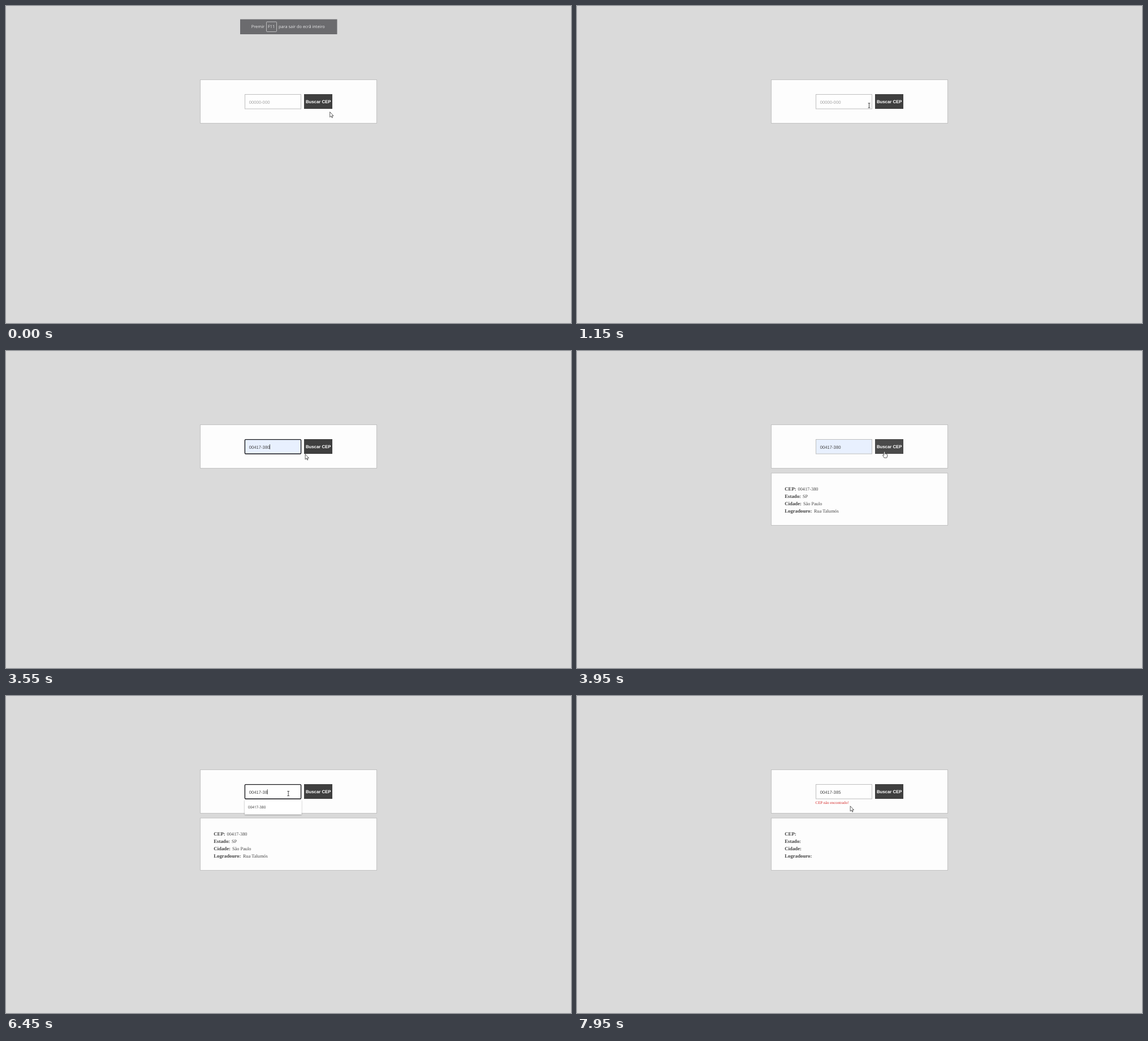
These frames come from a looping animation (999x561 px, 8 s). An HTML page:

```html
<!DOCTYPE html>
<html lang="pt">
<head>
<meta charset="utf-8">
<title>Buscar CEP</title>
<style>
html, body { margin: 0; width: 100%; height: 100%; overflow: hidden; background: #dadada; }
svg { display: block; width: 100%; height: 100%; }
text { text-rendering: geometricPrecision; white-space: pre; }
.card { fill: #fdfdfd; stroke: #c2c2c2; }
.sans { font: 7.7px "Liberation Sans", Arial, sans-serif; }
.ui { font: 7.4px "Open Sans", sans-serif; fill: #e9e9ea; }
.serif { font: 8.3px "Liberation Serif", serif; fill: #454545; }
.serif .label { font-size: 8.8px; font-weight: bold; fill: #404040; }
.cursor { fill: #fff; stroke: #333; stroke-width: .8; stroke-linejoin: round; }
</style>
</head>
<body>
<svg viewBox="0 0 999 561">
  <defs>
    <filter id="shadow" x="-10%" y="-30%" width="120%" height="170%">
      <feDropShadow dx="0" dy=".8" stdDeviation=".8" flood-opacity=".4"/>
    </filter>
  </defs>

  <g id="toast">
    <rect x="414" y="23.5" width="171.5" height="26.5" fill="#6b6b6e"/>
    <rect x="460.5" y="28" width="18" height="17.5" rx="1.2" fill="none" stroke="#d2d2d3" stroke-width=".8"/>
    <g class="ui">
      <text x="433.8" y="39.4">Premir</text>
      <text x="463" y="39.4">F11</text>
      <text x="482" y="39.4">para sair do ecrã inteiro</text>
    </g>
  </g>

  <rect class="card" x="343.5" y="130.5" width="312" height="77"/>
  <rect id="field"/>
  <text id="value" class="sans" x="429.7" y="172.7"></text>
  <path id="caret" stroke="#222" stroke-width=".8"/>
  <rect id="button" x="527" y="156" width="50" height="26"/>
  <text class="sans" x="529.9" y="172" fill="#fff" style="font-weight:bold;font-size:7.8px">Buscar CEP</text>
  <text id="error" class="serif" x="421.5" y="191.3" style="font-size:6.94px;fill:#d42a2a">CEP não encontrado!</text>

  <g id="result">
    <rect class="card" x="343.5" y="216" width="312" height="92.5"/>
    <g id="rows" class="serif"></g>
  </g>

  <g id="list">
    <rect x="422" y="184" width="100.5" height="25.5" fill="#fff" filter="url(#shadow)"/>
    <rect id="item" x="422" y="187" width="100.5" height="19" fill="#e6e6e6"/>
    <text class="ui" x="428" y="199.2" style="font-size:6.4px;fill:#333">00417-380</text>
  </g>

  <g id="mouse">
    <path id="arrow" class="cursor" d="M0 0V9.2L2.1 7.3 3.6 10.4 4.9 9.8 3.5 6.8H6.3Z"/>
    <g id="beam" fill="none" stroke="#333" stroke-width=".9">
      <path d="M-1.9 -4H1.9M-1.9 4H1.9M0 -4V4"/>
    </g>
    <path id="hand" class="cursor" d="M-1 1Q-1 0 0 0T1 1V4Q2 3.3 2.8 4.3 3.7 3.8 4 4.8 5 4.6 5 5.8V8L4 11H-.5L-2.8 7.2Q-3.6 5.8 -2.3 5.6L-1 6.6Z"/>
  </g>
</svg>
<script>
const $ = id => document.getElementById(id);
const CEP = "00417-380", LOOP = 8000, STEP = 50;

const rows = [["CEP:", CEP, 390.5], ["Estado:", "SP", 399], ["Cidade:", "São Paulo", 400], ["Logradouro:", "Rua Talumós", 419]];
$("rows").innerHTML = rows.map(([label, value, x], i) => {
  const y = 247.2 + 13 * i;
  return `<text class="label" x="367.2" y="${y}">${label}</text><text class="found" x="${x}" y="${y}">${value}</text>`;
}).join("");
const found = document.querySelectorAll(".found");

// Pointer stops: time, x, y
const stops = [
  [0, 572.7, 187.5], [450, 572.7, 187.5], [1150, 516.5, 176], [2250, 516.5, 176],
  [2550, 487.5, 195.7], [3250, 487.5, 195.7], [3700, 543.7, 178], [4050, 543.7, 178],
  [4400, 527, 230], [4750, 527, 230], [5250, 499.2, 172.6], [6950, 499.2, 172.6],
  [7250, 552.7, 171.3], [7500, 552.7, 171.3], [7950, 483.2, 194.8], [LOOP, 483.2, 194.8]
];

function pointer(t) {
  const i = stops.findIndex(s => s[0] > t);
  const [t0, x0, y0] = stops[i - 1], [t1, x1, y1] = stops[i];
  const p = (t - t0) / (t1 - t0), e = p * p * (3 - 2 * p);
  return [x0 + (x1 - x0) * e, y0 + (y1 - y0) * e];
}

const show = (id, on) => $(id).setAttribute("visibility", on ? "visible" : "hidden");

function set(id, attrs) {
  for (const k in attrs) $(id).setAttribute(k, attrs[k]);
}

function draw(t) {
  const within = (a, b) => t >= a && t < b;
  const [x, y] = pointer(t);
  const inside = (l, top, r, b) => x >= l && x < r && y >= top && y < b;

  const focus = within(2050, 3750) || within(5350, 7400);
  const list = within(2050, 3250) || within(6100, 6650);
  const overItem = list && inside(422, 187, 522, 206);
  const overField = inside(422, 156, 522, 182);
  const overButton = inside(527, 156, 577, 182);
  const preview = t < 3250 && overItem;
  const filled = preview || t >= 3250;

  $("toast").setAttribute("opacity", Math.max(0, Math.min(1, 1 - t / 350)));

  set("field", {
    ...(focus ? { x: 422.4, y: 156.6, width: 99.2, height: 25.4, rx: 1.5 }
              : { x: 422.5, y: 156.5, width: 99, height: 25.5, rx: 0 }),
    fill: filled && t < 6100 ? "#e8f0fe" : "#fefefe",
    stroke: focus ? "#17171b" : "#bebebe",
    "stroke-width": focus ? 1.4 : 1
  });

  const value = $("value");
  value.textContent = !filled ? "00000-000"
    : t < 6100 ? CEP
    : t < 6650 ? CEP.slice(0, -1)
    : CEP.slice(0, -1) + "5";
  value.style.fontSize = preview ? "6.75px" : "";
  set("value", { fill: !filled ? "#a2a2a2" : preview ? "#222" : "#444" });

  const caretX = t < 3250 ? 430 : 429.7 + value.getComputedTextLength();
  set("caret", { d: `M${caretX} 165.2V174` });
  show("caret", focus && (within(2050, 2550) || within(3100, 3600) || within(5350, 5950) || within(6450, 7000)));

  set("button", { fill: overButton ? "#4a4a4a" : "#3f3f3f" });
  show("list", list);
  show("item", overItem);
  show("result", t >= 3900);
  show("error", t >= 7600);
  found.forEach(el => el.style.display = t >= 7600 ? "none" : "");

  set("mouse", { transform: `translate(${x} ${y})` });
  show("beam", overField);
  show("hand", overButton);
  show("arrow", !overField && !overButton);
}

const start = performance.now();
function frame(now) {
  const t = Math.max(0, now - start) % LOOP;
  draw(Math.floor(t / STEP) * STEP);
  requestAnimationFrame(frame);
}
draw(0);
requestAnimationFrame(frame);
</script>
</body>
</html>
```
